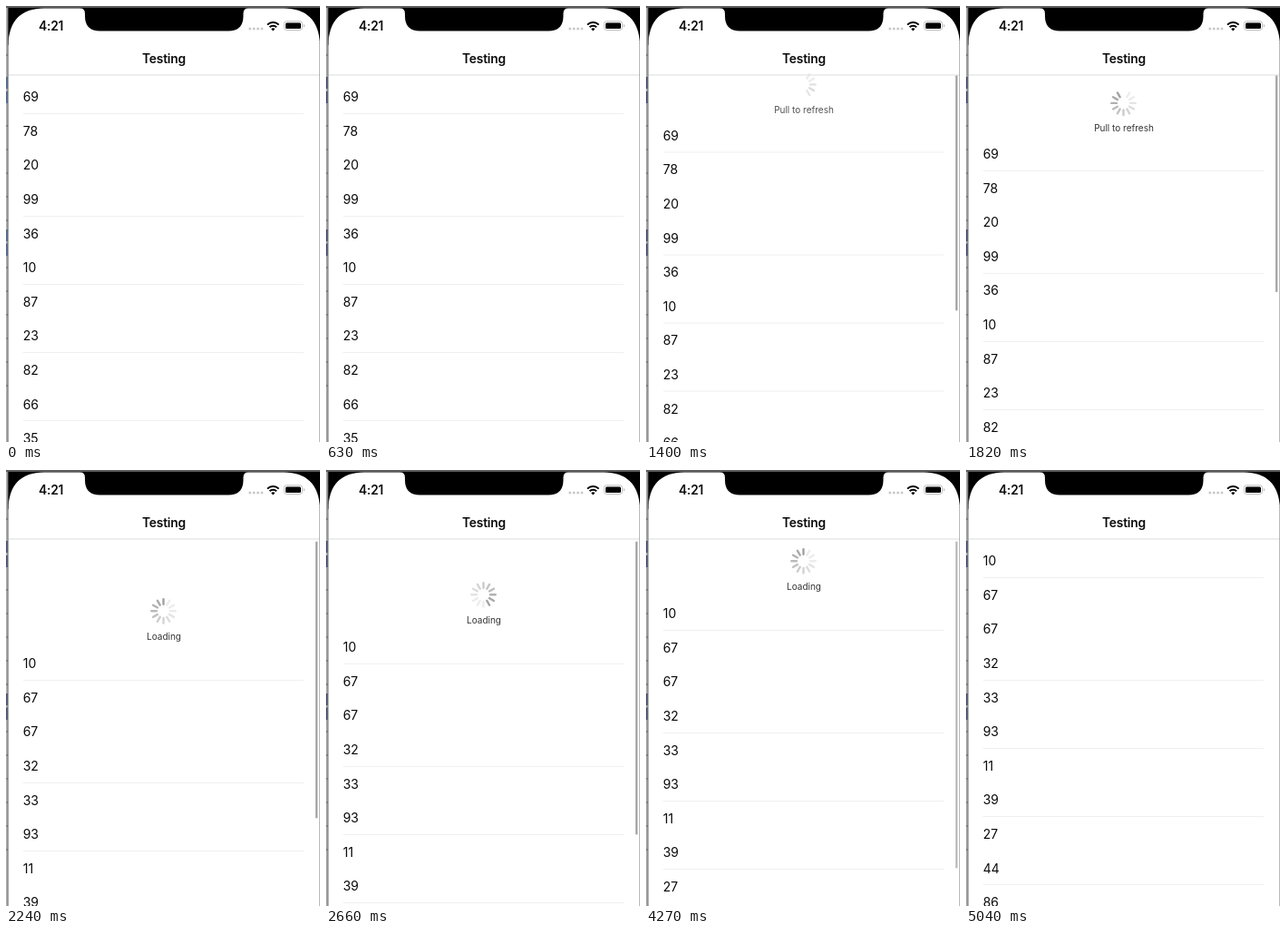
An HTML page that plays this animation: 346x480 px, repeating every 5.32 s.

```html
<!DOCTYPE html>
<html lang="en">
<head>
<meta charset="utf-8">
<title>Pull to refresh</title>
<style>
  html, body { margin: 0; width: 100%; height: 100%; overflow: hidden; background: #fff; }
  svg { display: block; width: 346px; height: 480px; }
  text { font-family: Inter, Roboto, "Liberation Sans", sans-serif; fill: #0a0a0a; }
  .row { font-size: 14px; }
  .bold { font-size: 13.8px; font-weight: 600; letter-spacing: -.2px; }
  .hint { font-size: 10px; text-anchor: middle; fill: #333; }
</style>
</head>
<body>
<svg viewBox="0 0 346 480">
  <rect width="346" height="480" fill="#fff"/>
  <g id="list"></g>
  <g id="spinner"></g>
  <text id="hint" class="hint" x="174"></text>
  <rect id="bar" x="341" width="2.4" rx="1.2" fill="#a8a8a8"/>

  <!-- navigation bar -->
  <rect x="3" y="75.5" width="343" height="1" fill="#dedede"/>
  <text class="bold" x="174" y="63" text-anchor="middle">Testing</text>

  <!-- device frame -->
  <path d="M2 2H346V42C345 16 331 2.6 306 2.6H267Q261.5 2.6 261.5 8.5V11Q261.5 27.6 245 27.6H103.5Q87 27.6 87 11V8.5Q87 2.6 81.5 2.6H42C17 2.6 3 16 2.6 43H2Z"/>
  <rect width="346" height="2" fill="#5c5c5c"/>
  <rect x="345.4" y="40" width=".6" height="440" fill="#8a8a8a"/>
  <g id="edge"></g>
  <rect x="1.6" y="2" width="1" height="478" fill="#666"/>

  <!-- status bar -->
  <text class="bold" x="36" y="26.8">4:21</text>
  <g fill="#cacaca">
    <circle cx="268.8" cy="25" r="1.5"/><circle cx="273.2" cy="25" r="1.5"/>
    <circle cx="277.6" cy="25" r="1.5"/><circle cx="282" cy="25" r="1.5"/>
  </g>
  <g fill="none" stroke="#000" stroke-width="2">
    <path d="M288 20.6A9 9 0 0 1 300.6 20.6"/>
    <path d="M290.5 23.2A5.4 5.4 0 0 1 298.1 23.2"/>
  </g>
  <path d="M294.3 27.4L292.2 25.2A3 3 0 0 1 296.4 25.2Z"/>
  <rect x="306.5" y="16.9" width="20" height="9.6" rx="2.8" fill="none" stroke="#bdbdbd"/>
  <rect x="308" y="18.4" width="17" height="6.6" rx="1.5"/>
  <path d="M327.8 20v3.6q1.4-.5 1.4-1.8t-1.4-1.8" fill="#bdbdbd"/>
</svg>
<script>
const LOOP = 5320, STEP = 70, PITCH = 37.6, REST = 58;
const DRAG = 840, REFRESH = 1960, RELEASE = 2590, CLOSE = 4830, DONE = 5040;
const before = [69, 78, 20, 99, 36, 10, 87, 23, 82, 66, 35];
const after = [10, 67, 67, 32, 33, 93, 11, 39, 27, 44, 86];

const $ = id => document.getElementById(id);
const clamp = v => Math.max(0, Math.min(1, v));
const progress = (t, from, to) => clamp((t - from) / (to - from));
const smooth = p => p * p * (3 - 2 * p);

function add(parent, tag, attrs) {
  const el = document.createElementNS("http://www.w3.org/2000/svg", tag);
  set(el, attrs);
  return parent.appendChild(el);
}

function set(el, attrs) {
  for (const k in attrs) el.setAttribute(k, attrs[k]);
}

// distance the list is pulled down
function pull(t) {
  if (t < REFRESH) return 66 * progress(t, DRAG, 1890) ** .7;
  if (t < RELEASE) return 104 + 14 * Math.sin(progress(t, REFRESH, RELEASE) * Math.PI / 2);
  if (t < CLOSE) return REST + 60 * Math.exp((RELEASE - t) / 145);
  return REST * (1 - smooth(progress(t, CLOSE, DONE)));
}

const labels = before.map((_, i) => {
  // only dividers that land on a whole pixel are visible
  if (i === 0 || (i % 2 && i > 1))
    add($("list"), "rect", { x: 19, y: Math.round(118 + i * PITCH), width: 309, height: 1, fill: "#efefef" });
  return add($("list"), "text", { class: "row", x: 18.7, y: 105.2 + i * PITCH });
});

const petals = Array.from({ length: 12 }, (_, i) => add($("spinner"), "line", {
  y1: -7.6, y2: -13.2, "stroke-width": 2.4, "stroke-linecap": "round", transform: `rotate(${i * 30})`
}));

// sliver of the window behind the device
add($("edge"), "rect", { y: 2, width: 2, height: 478, fill: "#b2b2b5" });
for (let y = 53; y < 420; y += 26)
  add($("edge"), "rect", { y, width: 2, height: 2, fill: "#88888c" });
const patches = [78, 94, 246, 262].map(y =>
  add($("edge"), "rect", { y, width: 2, height: 13 }));

function drawSpinner(t, offset, loading) {
  // petals appear one by one while pulling, then spin
  const head = loading ? Math.floor(14.05 + .0117 * (t - 3360)) : 11;
  const revealed = loading ? 12 : (offset - 28) / 38 * 12;
  petals.forEach((p, i) => {
    const age = ((head - i) % 12 + 12) % 12;
    const tone = Math.round(162 + 74 * Math.min(1, age / 9));
    set(p, { stroke: `rgb(${tone},${tone},${tone})`, opacity: clamp(revealed - (i + 11) % 12) });
  });
  const size = t > CLOSE ? offset / REST : 1;
  const y = offset + (loading ? 42.3 : 44);
  set($("spinner"), { transform: `translate(173.5 ${y}) scale(${size})`, opacity: size });
}

function draw(t) {
  const offset = pull(t);
  const loading = t >= REFRESH;

  $("list").setAttribute("transform", `translate(0 ${offset})`);
  labels.forEach((label, i) => label.textContent = (loading ? after : before)[i]);

  $("hint").textContent = loading ? "Loading" : "Pull to refresh";
  set($("hint"), { y: offset + (loading ? 73.8 : 75), opacity: clamp((offset - 6) / 43) });

  set($("bar"), {
    y: loading ? 78.5 : 76,
    height: (loading ? 418 : 302) - offset,
    opacity: progress(t, DRAG, 980) - progress(t, 4200, 4480)
  });

  drawSpinner(t, offset, loading);
  patches.forEach(p => p.setAttribute("fill", t < 630 ? "#5a6d8c" : "#4f5a74"));
}

const start = performance.now();
function tick() {
  const t = (performance.now() - start) % LOOP;
  draw(Math.floor(t / STEP) * STEP);
  requestAnimationFrame(tick);
}
tick();
</script>
</body>
</html>
```
